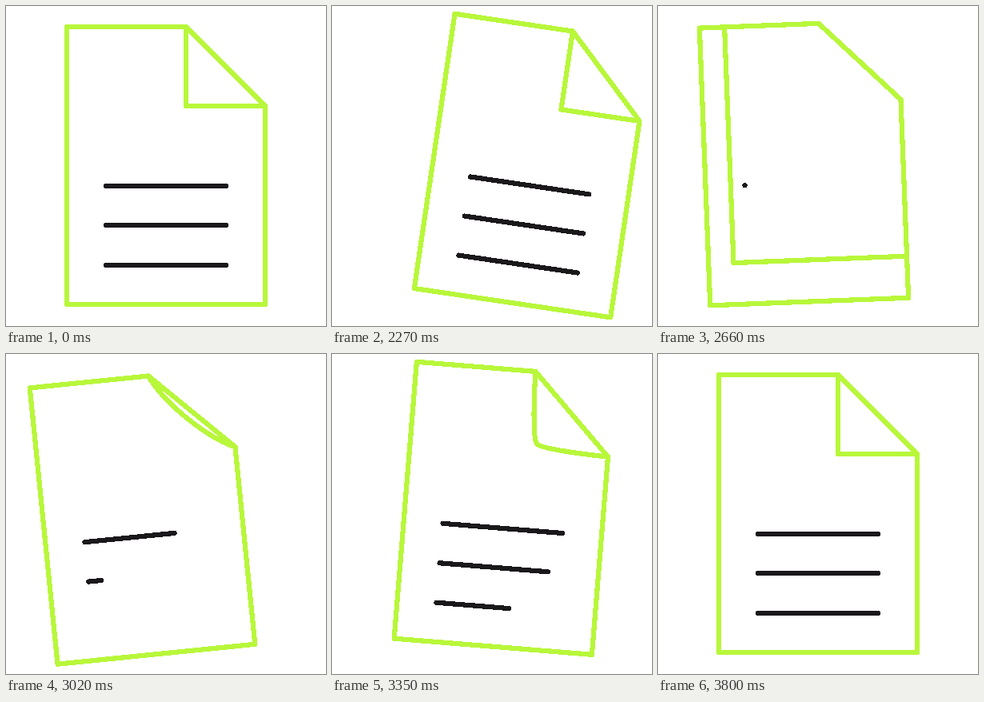
Write an HTML page that moves like this. It is 400x400 px and loops after 3830 ms.

```html
<!DOCTYPE html>
<html lang="en">
<head>
<meta charset="utf-8">
<title>Document page turn</title>
<style>
  html, body { margin: 0; width: 100%; height: 100%; overflow: hidden; background: #fff; }
  svg { display: block; width: 100vw; height: 100vh; }
  path {
    fill: none; stroke-width: 6.2; stroke-linecap: round; stroke-linejoin: round;
    shape-rendering: crispEdges;
  }
  .edge { stroke: #b8f73a; }
  .line { stroke: #1a181b; }
</style>
</head>
<body>
<svg viewBox="0 0 400 400">
  <g id="page">
    <path class="line"/>
    <path class="line"/>
    <path class="line"/>
    <path class="edge" id="fold"/>
    <path class="edge" d="M76 26H225L324 125V373H76Z"/>
  </g>
</svg>
<script>
const LOOP = 3830, START = 2000, STEP = 30;

// The page sways through these poses; arc bends the way there up or down
const MOVES = [
  { from: 2000, to: 2330, x: 55.7, y: 0, tilt: 9.2, arc: 0 },
  { from: 2395, to: 2771, x: -37, y: 2.5, tilt: -7.5, arc: -8, lag: 30 },
  { from: 2908, to: 3380, x: 16, y: -7, tilt: 4.8, arc: 4 },
  { from: 3380, to: 3770, x: 0, y: 0, tilt: 0, arc: -1.7 }
];
const TURN = MOVES[1];        // the sheet turns over on the way left
const COVERED = 2655;         // from here the old lines are out of sight
const CURL = [2855, 3535];    // the new corner folds in
const WRITE = 541, LINE_STARTS = [2655, 2912, 3041];

const page = document.getElementById('page');
const fold = document.getElementById('fold');
const lines = document.querySelectorAll('.line');

function ease(t, from, to) {
  const u = Math.min(1, Math.max(0, (t - from) / (to - from)));
  return u * u * (3 - 2 * u);
}

function pose(t) {
  let x = 0, y = 0, tilt = 0;
  for (const { from, to, lag = 0, ...end } of MOVES) {
    const p = ease(t, from, to);
    x += (end.x - x) * p;
    y += (end.y - y) * p + end.arc * 4 * p * (1 - p);
    tilt += (end.tilt - tilt) * ease(t - lag, from, to);
  }
  return `translate(${x} ${y}) rotate(${tilt} 200 199.5)`;
}

function foldPath(t) {
  if (t < TURN.to) {
    const p = ease(t, TURN.from, TURN.to);
    return `M225 26H${225 - 149 * p}V${125 + 248 * p}H324V125`;
  }
  const p = ease(t, ...CURL), k = 40 * (1 - p);
  const x = 274.5 - 49.5 * p, y = 75.5 + 49.5 * p;
  return `M225 26C225 26 ${x - k} ${y - k} ${x} ${y}S324 125 324 125`;
}

function draw(t) {
  page.setAttribute('transform', pose(t));
  fold.setAttribute('d', foldPath(t));
  fold.style.fill = t < COVERED ? '#fff' : 'none';
  LINE_STARTS.forEach((start, i) => {
    const length = 150 * (t < COVERED ? 1 : ease(t, start, start + WRITE));
    lines[i].setAttribute('d', length > 0 ? `M125 ${224.7 + 49.6 * i}h${length}` : '');
  });
}

const origin = performance.now();
function tick() {
  const t = (performance.now() - origin) % LOOP;
  draw(START + Math.max(0, Math.floor((t - START) / STEP)) * STEP);
  requestAnimationFrame(tick);
}
tick();
</script>
</body>
</html>
```
